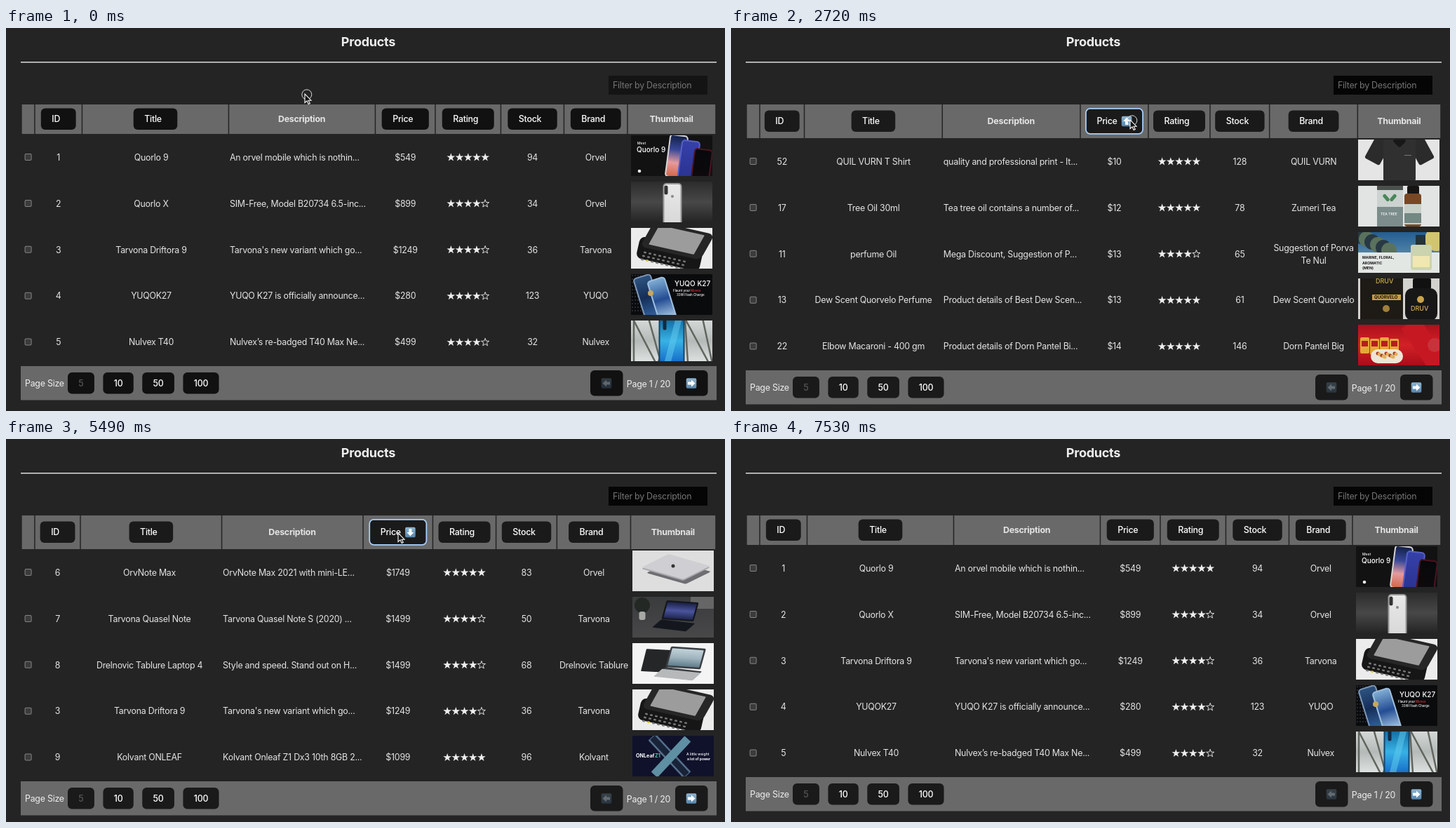
An HTML page with a canvas that plays this animation: 1025x546 px, repeating every 7.58 s.

```html
<!DOCTYPE html>
<html lang="en">
<head>
<meta charset="utf-8">
<title>Products</title>
<style>
html, body { margin: 0; width: 100%; height: 100%; overflow: hidden; background: #242424 }
canvas { display: block }
</style>
</head>
<body>
<canvas id="stage" width="1025" height="546"></canvas>
<script>
const c = document.getElementById('stage').getContext('2d');
const LOOP = 7580;

// ---- drawing helpers ----
function rect(x, y, w, h, fill, r = 0) {
  c.beginPath();
  c.roundRect(x, y, w, h, r);
  c.fillStyle = fill;
  c.fill();
}
// Rounded box around a centre, turned and slanted.
function box(x, y, w, h, fill, { angle = 0, skew = 0, r = 3 } = {}) {
  c.save();
  c.translate(x, y);
  c.rotate(angle);
  c.transform(1, 0, skew, 1, 0, 0);
  rect(-w / 2, -h / 2, w, h, fill, r);
  c.restore();
}
function disc(x, y, r, fill) {
  c.beginPath();
  c.arc(x, y, r, 0, 7);
  c.fillStyle = fill;
  c.fill();
}
function ring(x, y, r) {
  c.beginPath();
  c.arc(x, y, r, 0, 7);
  c.strokeStyle = '#ddd';
  c.lineWidth = 1;
  c.stroke();
}
function font(size, weight) {
  c.font = `${weight} ${size}px Inter, sans-serif`;
  c.letterSpacing = size < 11 ? '0px' : '-0.25px';
}
function text(s, x, y, { size = 12.4, weight = 400, align = 'center', fill = '#e4e4e4' } = {}) {
  font(size, weight);
  c.textAlign = align;
  c.fillStyle = fill;
  c.fillText(s, x, y);
}
function fade(y0, y1, ...colors) {
  const g = c.createLinearGradient(0, y0, 0, y1);
  colors.forEach((k, i) => g.addColorStop(i / (colors.length - 1), k));
  return g;
}

// ---- thumbnails, each W x H ----
const W = 116, H = 58;
const ground = (...colors) => rect(0, 0, W, H, colors[1] ? fade(0, H, ...colors) : colors[0]);
const caption = (s, x, y, size, fill = '#fff', weight = 500) =>
  text(s, x, y, { size, fill, weight, align: 'left' });
function phone(x, y, angle, rim, ...screen) {
  box(x, y, 27, 62, rim, { angle, r: 5 });
  box(x, y, 23, 58, fade(-28, 28, ...screen), { angle });
}
function laptop(x, y, w, body, ...screen) {
  box(x, y, w, w * .6, body, { angle: .07, skew: -.2, r: 2 });
  box(x, y, w * .9, w * .5, fade(-w / 4, w / 4, ...screen), { angle: .07, skew: -.2, r: 1 });
  box(x - w * .2, y + w * .45, w * 1.05, w * .28, body, { angle: .12, skew: -.9, r: 1 });
}

const thumbs = {
  trio() {
    ground('#121212');
    phone(65, 30, .13, '#d9d4d6', '#15224c', '#384798', '#e49b9e', '#d46a50');
    phone(82, 38, .13, '#5560c8', '#3540a8', '#2a3290');
    phone(100, 50, .13, '#4a1420', '#08080b', '#100a0e');
    caption('Meet', 9, 13, 5);
    caption('Quorlo 9', 8, 24, 10);
    disc(12, 51, 2.3, '#eee');
  },
  single() {
    ground('#2c2c2c', '#484848', '#242424');
    phone(59, 33, 0, '#999', '#e8e8e8', '#d8d8d8');
    box(50, 12, 5, 13, '#333');
    disc(59, 21, 2, '#888');
  },
  slider() {
    ground('#ececec');
    box(55, 37, 92, 32, '#161616', { angle: .22, r: 8 });
    for (let i = 0; i < 27; i++) {
      const col = i % 9, row = i / 9 | 0;
      box(20 + col * 7 - row * 2, 35 + col * 1.6 + row * 5, 4, 2.5, i == 19 ? '#d8c838' : '#777', { angle: .2, r: 1 });
    }
    box(66, 18, 88, 40, '#262626', { angle: .22, skew: -.3, r: 8 });
    box(65, 17, 66, 30, '#9c9c9c', { angle: .22, skew: -.3, r: 1 });
  },
  pair() {
    ground('#0a0b0d');
    for (let i = 0; i < 44; i++) disc(2 + i % 4 * 4, 2 + (i >> 2) * 5, .7, '#565d69');
    phone(24, 32, -.3, '#7f98b8', '#2c517d', '#152e58', '#315f99');
    phone(44, 36, -.3, '#9fbfdd', '#7aa7d0', '#244d93', '#a8c8e4');
    disc(28, 27, 4, '#c7a75e');
    caption('YUQO K27', 62, 17, 10);
    caption('Flaunt your', 60, 25, 4.5);
    caption('Moves', 85, 25, 4.5, '#d83438');
    caption('33W Flash Charge', 65, 31, 4.5);
  },
  blue() {
    ground('#d4d9d8', '#b4bab8', '#dde1e0');
    for (let i = 0; i < 8; i++) box(4 + i * 15, H / 2, 2.5, 80, '#62665f', { angle: Math.sin(i * 5) * .5 });
    box(58, 29, 37, 70, '#12466a');
    box(58, 29, 33, 70, fade(-29, 29, '#1470a5', '#38b2e5', '#1770ca'));
    box(60, 29, 9, 80, '#60cbee88', { angle: .25 });
    box(48, 6, 5, 15, '#102b42');
  },
  shirt() {
    ground('#e5e5e5');
    for (const side of [-1, 1]) box(59 + side * 30, 14, 24, 40, '#2b2b2b', { angle: -side * .5 });
    box(59, 29, 46, 60, '#303030');
    box(59, 2, 14, 14, '#181818', { angle: Math.PI / 4 });
    rect(66, 22, 10, 1, '#777');
  },
  oil() {
    ground('#e2e4e3');
    rect(27, 0, 37, H, '#cbd2cf');
    rect(27, 0, 37, 6, '#4b514d');
    rect(27, 30, 37, 28, '#7c8d8b');
    for (const side of [-1, 1]) box(45 + side * 5, 17, 5, 12, '#49865a', { angle: side * .7 });
    caption('TEA TREE', 32, 42, 5);
    rect(70, 0, 17, 12, '#171514', 2);
    rect(66, 11, 24, 47, '#784723', 4);
    rect(66, 26, 24, 29, '#c7cfc9');
    rect(66, 39, 24, 14, '#738783');
  },
  marine() {
    ground('#245d91', '#79a7be');
    for (let i = 0; i < 6; i++) disc(4 + i * 8, 6 + i * 4, 11, i % 2 ? '#5a725d' : '#283944');
    disc(112, 10, 17, '#d2c56f');
    rect(0, 29, W, 29, '#e3e7e4');
    ['MARINE, FLORAL,', 'AROMATIC', '(MEN)'].forEach((s, i) => caption(s, 6, 38 + i * 7.5, 5.2, '#171717', 700));
    rect(82, 4, 14, 15, '#24333a');
    rect(75, 18, 30, 36, '#cbd4ae', 3);
    rect(78, 34, 24, 16, '#f0e7b2');
  },
  scent() {
    ground('#d3d2cf');
    rect(3, 0, 61, H, '#1e1b16');
    caption('DRUV', 25, 7, 9, '#ccaa55');
    rect(20, 23, 41, 8, '#c69d40');
    caption('QUORVELO', 23, 29, 6, '#1c160c', 700);
    disc(40, 43, 5, '#9f803b');
    rect(78, 0, 26, 15, '#111', 2);
    rect(67, 14, 46, 46, '#171717', 10);
    disc(89, 30, 5, '#c9a34a');
    caption('DRUV', 75, 46, 9, '#d4b05a');
  },
  noodles() {
    ground('#ad101c', '#d22127', '#a90d18');
    box(96, 30, 30, 80, '#c51822', { angle: -.6 });
    for (let i = 0; i < 4; i++) {
      rect(3 + i * 14, 18 + i % 2 * 2, 13, 23, '#e6a83a', 2);
      rect(5 + i * 14, 23, 9, 8, '#b91c20');
    }
    box(41, 45, 46, 20, '#efe5d5', { r: 10 });
    for (let i = 0; i < 14; i++) disc(28 + i * 2, 41 + i * 7 % 6, 2.5, i % 3 ? '#e0b05c' : '#a63a20');
    disc(109, 29, 10, '#c8323a');
  },
  slab() {
    ground('#dedede');
    const lid = { angle: .28, skew: -1.1, r: 2 };
    box(66, 31, 58, 27, '#6d6d72', lid);
    box(62, 25, 62, 29, '#a8a8ac', lid);
    box(62, 23, 62, 29, '#cfcfd3', lid);
    disc(58, 22, 2.5, '#333');
  },
  desk() {
    ground('#3a3b3d', '#484849');
    box(100, 4, 34, 26, '#666');
    disc(14, 12, 11, '#232824');
    box(14, 27, 9, 12, '#a8a9a6');
    laptop(68, 20, 46, '#14171d', '#1c2148', '#4a549c', '#20264f');
  },
  laptops() {
    ground('#f4f4f4');
    box(34, 25, 36, 32, '#242628', { angle: .05, skew: -.2, r: 1 });
    laptop(76, 21, 50, '#3a3e42', '#c2d2d9', '#9fb4be', '#5f7c8a');
    box(64, 45, 56, 12, '#b6b8ba', { angle: .1, skew: -.9, r: 1 });
  },
  cross() {
    ground('#10122b');
    box(53, 29, 14, 74, '#56708c', { angle: -.75, r: 1 });
    box(53, 29, 9, 72, '#182338', { angle: -.75, r: 1 });
    box(55, 30, 12, 70, '#5f8fa2', { angle: .75, r: 1 });
    caption('ONLeaf', 5, 31, 7.2, '#fff', 700);
    caption('Z1', 32, 31, 7.2, '#56c0a8', 700);
    caption('A little weight', 77, 28, 5);
    caption('a lot of power', 78, 35, 5, '#fff', 700);
  }
};

// ---- table data: id, title, description, price, rating, stock, brand, thumbnail ----
const universe = [3, 'Tarvona Driftora 9', "Tarvona's new variant which go...", 1249, 4, 36, 'Tarvona', 'slider'];
const plain = { brandWeight: 90.5, rows: [
  [1, 'Quorlo 9', 'An orvel mobile which is nothin...', 549, 5, 94, 'Orvel', 'trio'],
  [2, 'Quorlo X', 'SIM-Free, Model B20734 6.5-inc...', 899, 4, 34, 'Orvel', 'single'],
  universe,
  [4, 'YUQOK27', 'YUQO K27 is officially announce...', 280, 4, 123, 'YUQO', 'pair'],
  [5, 'Nulvex T40', 'Nulvex’s re-badged T40 Max Ne...', 499, 4, 32, 'Nulvex', 'blue']
] };
const cheap = { brandWeight: 133.5, rows: [
  [52, 'QUIL VURN T Shirt', 'quality and professional print - It...', 10, 5, 128, 'QUIL VURN', 'shirt'],
  [17, 'Tree Oil 30ml', 'Tea tree oil contains a number of...', 12, 5, 78, 'Zumeri Tea', 'oil'],
  [11, 'perfume Oil', 'Mega Discount, Suggestion of P...', 13, 4, 65, 'Suggestion of Porva\nTe Nul', 'marine'],
  [13, 'Dew Scent Quorvelo Perfume', 'Product details of Best Dew Scen...', 13, 5, 61, 'Dew Scent Quorvelo', 'scent'],
  [22, 'Elbow Macaroni - 400 gm', 'Product details of Dorn Pantel Bi...', 14, 5, 146, 'Dorn Pantel Big', 'noodles']
] };
const dear = { brandWeight: 109, rows: [
  [6, 'OrvNote Max', 'OrvNote Max 2021 with mini-LE...', 1749, 5, 83, 'Orvel', 'slab'],
  [7, 'Tarvona Quasel Note', 'Tarvona Quasel Note S (2020) ...', 1499, 4, 50, 'Tarvona', 'desk'],
  [8, 'Drelnovic Tablure Laptop 4', 'Style and speed. Stand out on H...', 1499, 4, 68, 'Drelnovic Tablure', 'laptops'],
  universe,
  [9, 'Kolvant ONLEAF', 'Kolvant Onleaf Z1 Dx3 10th 8GB 2...', 1099, 5, 96, 'Kolvant', 'cross']
] };
const scenes = [
  { until: 810, data: plain },
  { until: 1290, data: plain, arrow: 'up', loading: true },
  { until: 2780, data: cheap, arrow: 'up' },
  { until: 3260, data: cheap, arrow: 'down', loading: true },
  { until: 5540, data: dear, arrow: 'down' },
  { until: 5960, data: dear, loading: true },
  { until: LOOP, data: plain }
];

// Column weights share the table width in proportion, as in automatic table layout.
const headers = { ID: 67.5, Title: 209, Description: 209, Price: 85.5, Rating: 93.5, Stock: 90, Brand: 0, Thumbnail: 126 };
const LEFT = 22, RIGHT = 1012, FIRST = 41, ARROW = 14;
function columnEdges({ data, arrow }) {
  const weights = Object.entries(headers).map(([name, w]) =>
    name == 'Brand' ? data.brandWeight : name == 'Price' && arrow ? w + 17.5 : w);
  const unit = (RIGHT - FIRST) / weights.reduce((a, b) => a + b);
  const edges = [FIRST];
  for (const w of weights) edges.push(edges.at(-1) + w * unit);
  return edges;
}

// ---- interface parts ----
function star(x, y, full) {
  c.beginPath();
  for (let i = 0; i < 10; i++) {
    const a = i * Math.PI / 5 - Math.PI / 2, r = i % 2 ? 2.4 : full ? 6.2 : 5.8;
    c.lineTo(x + r * Math.cos(a), y + .5 + r * Math.sin(a));
  }
  c.closePath();
  c.fillStyle = c.strokeStyle = '#eee';
  c.lineWidth = .9;
  full ? c.fill() : c.stroke();
}
const upArrow = new Path2D('M0-5.5 5 0H2V5H-2V0H-5Z');
function arrowIcon(x, y, turn, alpha = 1) {
  c.save();
  c.globalAlpha = alpha;
  c.translate(x, y);
  rect(-7.3, -7.3, 14.6, 14.6, fade(-7, 7, '#8db4d0', '#5686ae'), 2);
  c.rotate(turn);
  c.fillStyle = '#fff';
  c.fill(upArrow);
  c.restore();
}
function headerButton(label, center, mid, fill, arrow, focused) {
  font(12.4, 500);
  const w = c.measureText(label).width + 38 + (arrow ? ARROW : 0), h = arrow ? 36 : 30.5;
  const x = center - w / 2, y = mid - h / 2;
  rect(x, y, w, h, fill, 6);
  if (focused) {
    c.beginPath();
    c.roundRect(x, y, w, h, 6);
    c.strokeStyle = '#a6cffa';
    c.lineWidth = 1.8;
    c.stroke();
  }
  text(label, x + 15.5, mid + 4.2, { weight: 500, align: 'left', fill: '#fff' });
  if (arrow) arrowIcon(x + w - 23, mid + .2, arrow == 'up' ? 0 : Math.PI);
}
function row([id, title, description, price, rating, stock, brand, thumb], y, edges) {
  const center = i => (edges[i] + edges[i + 1]) / 2, base = y + 4.7;
  rect(26.6, y - 5, 10, 10, '#858585', 2);
  rect(27.6, y - 4, 8, 8, '#3b3b3b', 1);
  text(id, center(0), base);
  text(title, edges[1] + 98.5, base);
  text(description, edges[2] + 1.5, base, { align: 'left' });
  text('$' + price, center(3), base);
  for (let s = 0; s < 5; s++) star(center(4) + (s - 2) * 12.2, y, s < rating);
  text(stock, center(5), base);
  const lines = brand.split('\n');
  lines.forEach((line, i) => text(line, center(6), base + (i - (lines.length - 1) / 2) * 18));
  c.save();
  c.translate(Math.round(center(7) - W / 2 - .3), Math.round(y - 30.6));
  c.beginPath();
  c.rect(0, 0, W, H);
  c.clip();
  thumbs[thumb]();
  c.restore();
}
function table(scene, t) {
  const { data, arrow } = scene, grow = arrow ? 6 : 0, mid = 129.8 + grow / 2;
  const edges = columnEdges(scene), button = t < 640 ? '#111' : '#1a1a1a';

  [LEFT, ...edges].forEach((x, i, all) => {
    if (i < all.length - 1) rect(x + .7, 109, all[i + 1] - x - 1.5, 42 + grow, '#696969');
  });
  Object.keys(headers).forEach((label, i) => {
    const x = (edges[i] + edges[i + 1]) / 2, price = label == 'Price';
    if (/Desc|Thumb/.test(label)) text(label, x - .4, mid + 4.2, { weight: 700 });
    else headerButton(label, x, mid, button, price && arrow, price && t >= 640 && t < 7530);
  });
  data.rows.forEach((r, i) => row(r, 184 + grow + i * 65.9, edges));

  c.save();
  c.translate(0, grow);
  rect(21, 482, 992, 48.5, '#696969');
  text('Page Size', 27, 511, { align: 'left', fill: '#eee' });
  let x = 88;
  for (const n of [5, 10, 50, 100]) {
    font(12.4, 500);
    const w = c.measureText(n).width + 30.7;
    rect(x, 491, w, 30.5, button, 6);
    text(n, x + w / 2, 510.5, { weight: 500, fill: n == 5 ? '#555' : '#fff' });
    x += w + 12.5;
  }
  [[833, -1, .25], [954, 1, 1]].forEach(([x, side, alpha]) => {
    rect(x, 488, 46.5, 36.5, button, 6);
    arrowIcon(x + 23, 506.5, side * Math.PI / 2, alpha);
  });
  text('Page 1 / 20', 916, 511.5, { fill: '#eee' });
  c.restore();
}

// ---- pointer: rests at each point, then eases to the next between the two times ----
const start = [426, 94];
const moves = [[50, 400, 591, 131], [2130, 2610, 569, 131], [4300, 4540, 559, 134], [6490, 7080, 995, 560]];
function pointerAt(t) {
  return moves.reduce(([x, y], [from, to, x1, y1]) => {
    const k = Math.min(1, Math.max(0, (t - from) / (to - from))), e = k * k * (3 - 2 * k);
    return [x + (x1 - x) * e, y + (y1 - y) * e];
  }, start);
}
const within = (t, spans) => spans.some(([a, b]) => t >= a && t < b);
const arrowShape = new Path2D('M0 0V12.5L3 9.8 5.2 14.6 7.3 13.6 5.1 9.2H9Z');
const handShape = new Path2D('M1.8 1.5Q3-.2 4 1.5L5 5 7 4.6 9 5.2 11 6.5 10.5 10 9 13H4.2L.3 8.5Q-.2 6.8 1.5 7.2L3 8Z');
function pointer(t) {
  if (t >= 7080) return;
  const [x, y] = pointerAt(t);
  const hand = within(t, [[370, 640], [1410, 2610], [3260, 5370], [6020, 6560]]);
  if (within(t, [[0, 50], [640, 760], [2660, 2780], [5370, 5490]])) ring(x + 2.8, y + .8, 7);
  const shape = hand ? handShape : arrowShape;
  c.save();
  c.translate(hand ? x - 2 : x, hand ? y + 2 : y);
  c.lineWidth = 1.1;
  c.fillStyle = hand ? '#fff' : '#111';
  c.strokeStyle = hand ? '#111' : '#fff';
  c.fill(shape);
  c.stroke(shape);
  c.restore();
}

function draw(now) {
  const t = now % LOOP, scene = scenes.find(s => t < s.until);
  rect(0, 0, 1025, 546, '#242424');
  text('Products', 516.5, 25.5, { size: 18, weight: 700, fill: '#eee' });
  rect(21, 48, 992, 1.6, '#ddd');
  rect(859, 68, 141, 27, t < 640 ? '#141414' : '#050505');
  text('Filter by Description', 865, 85.5, { align: 'left', fill: '#757575' });
  table(scene, t);
  if (scene.loading) {
    rect(21, 56, 992, scene.arrow ? 480.5 : 474.5, '#00000080');
    text('Loading...', 516.5, 302.5, { size: 17.6, weight: 700, fill: '#919191' });
  }
  pointer(t);
  requestAnimationFrame(draw);
}
requestAnimationFrame(draw);
</script>
</body>
</html>
```
